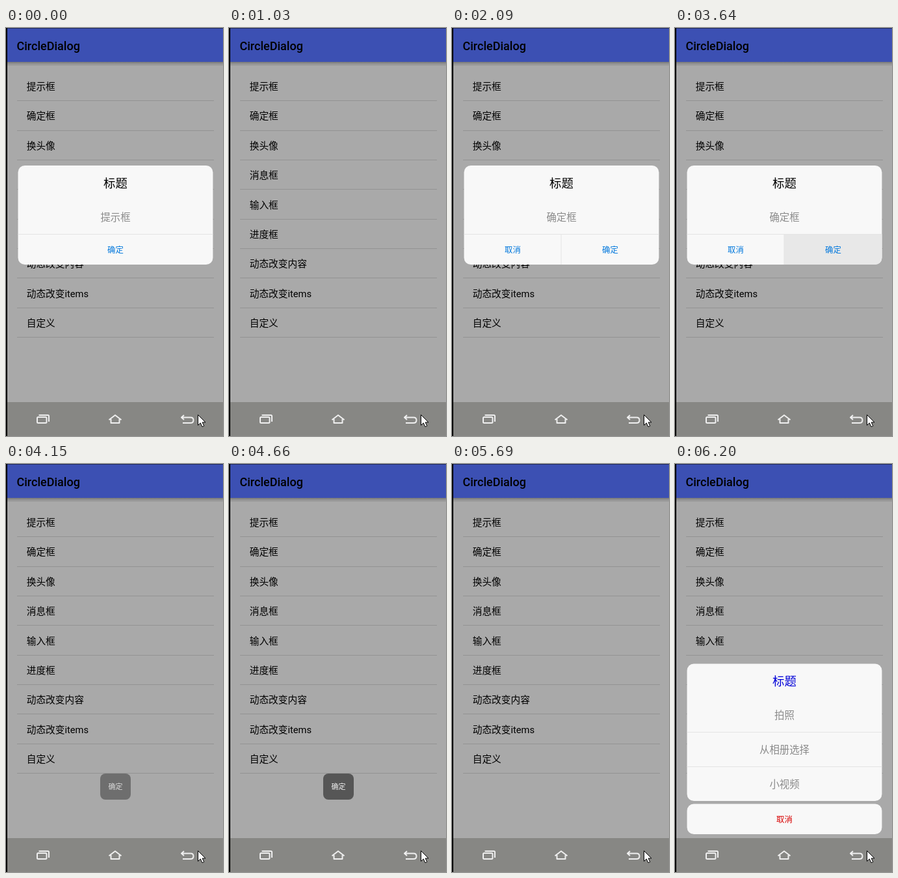
An HTML page for the animation above (8 s loop, 334x626 px).

```html
<!DOCTYPE html>
<html lang="zh-CN">
<head>
<meta charset="utf-8">
<title>CircleDialog</title>
<style>
html, body { margin: 0; width: 100%; height: 100%; overflow: hidden; background: #a9a9a9; }
svg { display: block; width: 100%; height: 100%; }
text { font-family: Roboto, "Noto Sans CJK SC", "Noto Sans CJK", sans-serif; }
.app { font-size: 18px; font-weight: 500; }
.row { font-size: 14.7px; }
.rule { fill: #939393; }
.hair { fill: #e4e4e4; }
.card { fill: #f8f8f8; }
.title, .body, .button, .toast text { text-anchor: middle; }
.title { font-size: 18.4px; }
.body { font-size: 15.4px; fill: #8a8a8a; }
.button { font-size: 12.4px; fill: #0077dc; }
.toast text { font-size: 11px; fill: #f0f0f0; }
.icon { fill: none; stroke: #efefef; stroke-width: 2; stroke-linejoin: round; }

.notice, .confirm, .pressed, .toast, .sheet { opacity: 0; animation: 8s step-end infinite; }
.notice { animation-name: notice; }
.confirm { animation-name: confirm; }
.pressed { animation-name: pressed; }
.toast { animation-name: toast; }
.sheet { animation-name: sheet; }
@keyframes notice { 0% { opacity: 1 } 12.875%, 100% { opacity: 0 } }
@keyframes confirm { 0% { opacity: 0 } 26.125% { opacity: 1 } 51.875%, 100% { opacity: 0 } }
@keyframes pressed { 0% { opacity: 0 } 45.5% { opacity: 1 } 51.875%, 100% { opacity: 0 } }
@keyframes toast { 0% { opacity: 0 } 51.875% { opacity: .7 } 58.25% { opacity: 1 } 71.125%, 100% { opacity: 0 } }
@keyframes sheet { 0% { opacity: 0 } 77.5%, 100% { opacity: 1 } }
</style>
</head>
<body>
<svg viewBox="0 0 334 626" preserveAspectRatio="none">
  <defs>
    <linearGradient id="shadow" x2="0" y2="1">
      <stop stop-color="#777"/>
      <stop offset=".5" stop-color="#949494"/>
      <stop offset="1" stop-color="#a0a0a0"/>
    </linearGradient>
  </defs>

  <rect width="334" height="626" fill="#a9a9a9"/>
  <rect y="52" width="334" height="6" fill="url(#shadow)"/>
  <rect width="334" height="52" fill="#3c50b3"/>
  <rect width="334" height="1" fill="#20295a"/>
  <text class="app" x="16.5" y="33.6">CircleDialog</text>
  <g id="list"></g>

  <g class="toast">
    <rect x="145" y="475" width="47" height="40" rx="8" fill="#565656"/>
    <text x="168.5" y="499.2">确定</text>
  </g>

  <g class="notice">
    <rect class="card" x="18.5" y="211" width="300" height="152" rx="10.5"/>
    <rect class="hair" x="18.5" y="316" width="300" height="1"/>
    <text class="title" x="168.5" y="245">标题</text>
    <text class="body" x="168.5" y="296">提示框</text>
    <text class="button" x="168.5" y="344.8">确定</text>
  </g>

  <g class="confirm">
    <rect class="card" x="18.5" y="211" width="300" height="152" rx="10.5"/>
    <path class="pressed" d="M168 317H318.5V352.5A10.5 10.5 0 0 1 308 363H168Z" fill="#e8e8e8"/>
    <path class="hair" d="M18.5 316h300v1h-150v46h-1v-46h-149z"/>
    <text class="title" x="168.5" y="245">标题</text>
    <text class="body" x="168.5" y="296">确定框</text>
    <text class="button" x="93.5" y="344.8">取消</text>
    <text class="button" x="243.5" y="344.8">确定</text>
  </g>

  <g class="sheet">
    <rect class="card" x="18.5" y="306.5" width="300" height="210.5" rx="10.5"/>
    <rect class="card" x="18.5" y="521.5" width="300" height="46.5" rx="10.5"/>
    <rect class="hair" x="18.5" y="411" width="300" height="1"/>
    <rect class="hair" x="18.5" y="464" width="300" height="1"/>
    <text class="title" x="168.5" y="340" fill="#0000d8">标题</text>
    <text class="body" x="168.5" y="391.4">拍照</text>
    <text class="body" x="168.5" y="444">从相册选择</text>
    <text class="body" x="168.5" y="496.8">小视频</text>
    <text class="button" x="168.5" y="549.8" style="fill:#d80000">取消</text>
  </g>

  <rect y="574" width="334" height="52" fill="#878784"/>
  <g class="icon">
    <rect x="48" y="597" width="14.5" height="9" rx="1.5"/>
    <path d="M50.5 594H64.5Q66 594 66 595.5V604"/>
    <path d="M158.5 601.3L168 594L177.5 601.3M161.5 600V606H174.5V600"/>
    <path d="M271 597.5H284Q288.5 597.5 288.5 601.7T284 606H272M274 594L270 597.5L274 601"/>
  </g>
  <rect width="2" height="626"/>
  <path d="M295.5 593.5V609.5L299.3 606L302 611.8L304.8 610.6L302.2 605H307Z" fill="#fff" stroke="#000"/>
</svg>
<script>
const labels = ["提示框", "确定框", "换头像", "消息框", "输入框", "进度框", "动态改变内容", "动态改变items", "自定义"];
const pitch = 45.38;
document.getElementById("list").innerHTML = labels.map((label, i) => `
  <text class="row" x="31.7" y="${95.1 + pitch * i}">${label}</text>
  <rect class="rule" x="17" y="${Math.round(111.2 + pitch * i)}" width="303" height="1"/>`).join("");
</script>
</body>
</html>
```
